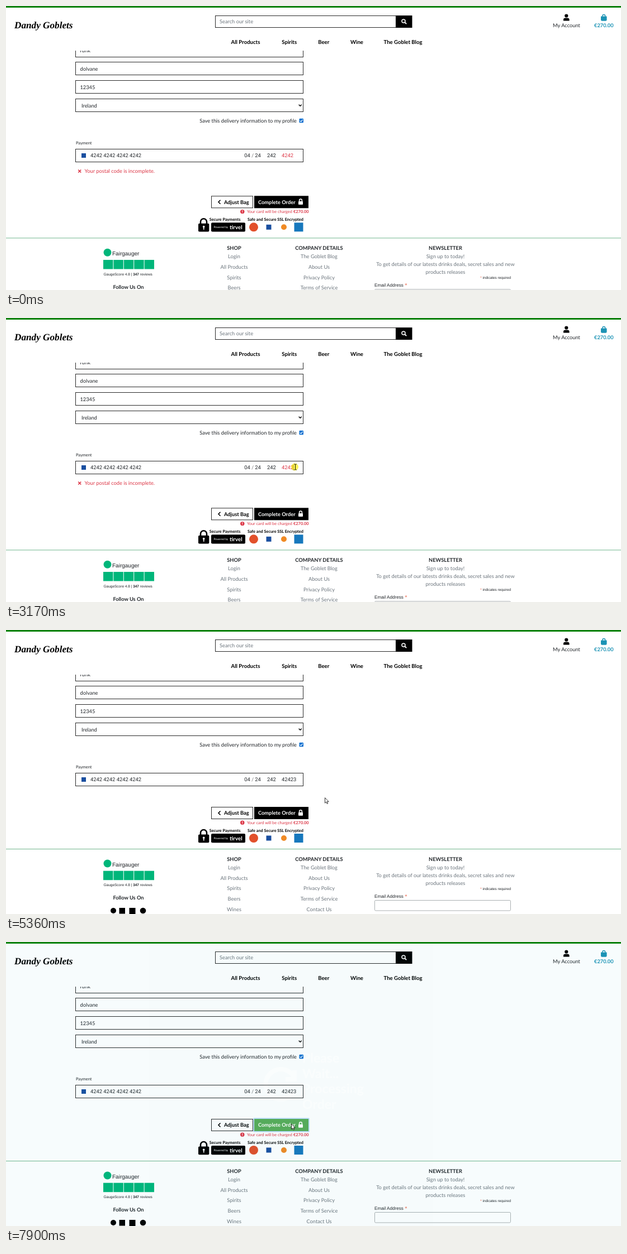
Animation of 1100x509 px, one loop 8000 ms. Source, as an HTML page:

```html
<!DOCTYPE html>
<html lang="en">
<head>
<meta charset="utf-8">
<title>Checkout</title>
<style>
  html, body { margin: 0; width: 100%; height: 100%; overflow: hidden; background: #fff; }
  svg { display: block; width: 100%; height: 100%; }
  text { font: 9.28px Lato, sans-serif; fill: #212529; text-rendering: geometricPrecision; white-space: pre; }
  .b { font-weight: 700; }
  .k { fill: #000; }
  .w { fill: #fff; }
  .m { text-anchor: middle; }
  .e { text-anchor: end; }
  .grey { fill: #6c757d; }
  .red { fill: #dc3545; }
  .teal { fill: #1c93b5; }
  .sm { font-size: 7.4px; }
  .nav { font-size: 9.6px; }
  .card { font: 9.35px Roboto, sans-serif; }
  .sans { font-family: "Liberation Sans", Arial, sans-serif; }
  .brand { font: italic 700 17.2px "Liberation Serif", serif; }
  .wait { font-size: 23px; }
  .box { fill: #fff; stroke: #2a2a2a; }
  .line { fill: none; stroke: #000; }
</style>
</head>
<body>
<svg viewBox="0 0 1100 509" preserveAspectRatio="none">
  <defs>
    <g id="lock">
      <path d="M-2.4 -.5v-2a2.4 2.4 0 0 1 4.8 0v2" fill="none" stroke="currentColor" stroke-width="1.5"/>
      <rect x="-4" y="-1" width="8" height="6" rx=".9" fill="currentColor"/>
    </g>
  </defs>

  <g id="form">
    <text x="132.5" y="83">runk</text>
    <text x="132.5" y="116">dolvane</text>
    <text x="132.5" y="148.5">12345</text>
    <text x="135" y="182">Ireland</text>
    <path class="line" d="M523.7 176.7l2.5 2.5 2.5-2.5" stroke-width="1.4"/>
    <text class="e" x="520" y="209">Save this delivery information to my profile</text>
    <rect x="524.5" y="201.8" width="7.5" height="7.5" rx="1.3" fill="#0b6fd0"/>
    <path d="M526 205.7l1.6 1.6 3-3.6" fill="none" stroke="#fff" stroke-width="1.2"/>
    <text class="sm" x="125" y="248.3">Payment</text>
    <rect x="135" y="264" width="8" height="8" fill="#1a4fa0"/>
    <text class="card" x="151" y="271.3">4242 4242 4242 4242</text>
    <text class="card" x="426.3" y="271.3">04 <tspan fill="#777">/</tspan> 24</text>
    <text class="card" x="467" y="271.3">242</text>
    <text class="card" x="493" y="271.3" id="zip"></text>
    <path id="caret" d="M0 263v10" class="line" stroke-width=".9"/>
    <g id="error">
      <path d="M129.2 293.5l5 5m0-5l-5 5" stroke="#dc3545" stroke-width="1.7"/>
      <text class="red" x="140.5" y="299.2">Your postal code is incomplete.</text>
    </g>
  </g>

  <g id="lower">
    <rect class="box" x="367.5" y="317.5" width="74" height="21"/>
    <path class="line" d="M383.5 324.5l-3.5 3.5 3.5 3.5" stroke-width="1.6"/>
    <text class="b k" x="390" y="331.3">Adjust Bag</text>
    <rect id="ring" x="442.2" y="315.2" width="100.6" height="25.6" rx="1.5" fill="#bfdeff"/>
    <rect x="444" y="317" width="97" height="22" fill="#fff"/>
    <g id="order">
      <rect id="fill" x="444" y="317" width="97" height="22"/>
      <text class="b w" x="451" y="331.3">Complete Order</text>
      <use href="#lock" x="527" y="327.7" color="#fff"/>
    </g>
    <circle cx="422.8" cy="345.3" r="3.7" fill="#dc3545"/>
    <path d="M422.8 343v2.8m0 .8v1.2" stroke="#fff" stroke-width="1.1"/>
    <text class="sm red" x="431" y="348">Your card will be charged</text>
    <text class="sm red b e" x="541.5" y="348">€270.00</text>

    <path class="line" d="M348 368v-4.5a5.5 5.5 0 0 1 11 0v4.5" stroke-width="2.6"/>
    <rect x="344" y="366.5" width="19.3" height="14.7" rx="1.8"/>
    <path d="M353.7 373v4.5" stroke="#fff" stroke-width="1.6"/>
    <circle cx="353.7" cy="372.3" r="1.8" fill="#fff"/>
    <text class="b k" x="363.7" y="362" style="font-size:7.3px">Secure Payments</text>
    <text class="b k" x="432" y="362" style="font-size:7.3px">Safe and Secure SSL Encrypted</text>
    <rect x="367" y="365" width="61" height="16.3" rx="2"/>
    <text class="w" x="371.5" y="375" style="font-size:5px">Powered by</text>
    <text class="w b" x="400" y="376.5" style="font-size:9.8px">tirvel</text>
    <circle cx="443" cy="373" r="8" fill="#e2502b"/>
    <rect x="465.5" y="368.5" width="9" height="9" fill="#1a4fa0"/>
    <circle cx="497" cy="373" r="5" fill="#f08a24"/>
    <rect x="515.5" y="365" width="16" height="16" fill="#1778bd"/>

    <path d="M0 392.6h1100" stroke="#70b58c"/>
    <circle cx="181.5" cy="418.5" r="7" fill="#00b67a"/>
    <text class="sans" x="190" y="424" style="font-size:10px">Fairgauger</text>
    <g id="rating" fill="#00b67a"></g>
    <text class="sans" x="174.5" y="459.3" style="font-size:6.5px">GaugeScore 4.8 | <tspan class="b">347</tspan> reviews</text>
    <text class="b m" x="219" y="483.3">Follow Us On</text>
    <circle cx="192" cy="503" r="5"/>
    <rect x="202.5" y="498" width="10.5" height="10.5"/>
    <rect x="220.5" y="498" width="11" height="11"/>
    <circle cx="245" cy="503" r="5.3"/>
    <g id="links"></g>
    <text class="sans" x="903" y="466" style="font-size:6.4px;text-anchor:end"><tspan fill="#e85c41">*</tspan> indicates required</text>
    <text class="sans" x="659" y="479.5" style="font-size:8.1px">Email Address</text>
    <text class="sans" x="713.5" y="481" style="font-size:10px;fill:#e85c41">*</text>
    <rect x="659.5" y="484.5" width="243" height="18.5" rx="1.7" fill="#fff" stroke="#abb0b2"/>
  </g>

  <g id="header">
    <rect width="1100" height="80" fill="#fff"/>
    <rect width="1100" height="2.9" fill="#008000"/>
    <text class="brand k" x="15" y="40">Dandy Goblets</text>
    <rect class="box" x="374.5" y="17.5" width="323" height="21"/>
    <text class="grey" x="382" y="31.3">Search our site</text>
    <rect x="697" y="17" width="29.5" height="22"/>
    <circle cx="711" cy="27" r="3" fill="none" stroke="#fff" stroke-width="1.5"/>
    <path d="M713.2 29.2l3 3" stroke="#fff" stroke-width="1.9"/>
    <circle cx="1002.3" cy="17.5" r="3.1"/>
    <path d="M997 26.5v-1.7q0-3.3 3.3-3.3h4q3.3 0 3.3 3.3v1.7z"/>
    <text class="m" x="1002.5" y="38.3">My Account</text>
    <path class="teal" d="M1064 18.5h10.6v6.2q0 2-2 2h-6.6q-2 0-2-2z"/>
    <path d="M1066.8 21v-3a2.5 2.5 0 0 1 5 0v3" fill="none" stroke="#1c93b5" stroke-width="1.3"/>
    <text class="teal b m" x="1069.3" y="38.3">€270.00</text>
  </g>

  <g id="overlay" opacity=".03">
    <rect width="1100" height="509" fill="#17a2b8"/>
    <g id="wait" opacity=".5">
      <path d="M514 240a27 27 0 1 0 0 30M516 230v16h-16" fill="none" stroke="#fff" stroke-width="8"/>
    </g>
  </g>

  <circle id="click" r="6.5" fill="#ffee00" opacity=".65"/>
  <g id="pointer">
    <path id="arrow" d="M0 0v9.5l2.2-2 1.5 3.4 1.5-.7-1.5-3.2h3z" fill="#fff" stroke="#000" stroke-width=".8"/>
    <path id="beam" class="line" d="M-2.3-5h1.8l.5.5.5-.5h1.8M-2.3 5h1.8l.5-.5.5.5h1.8M0-4.5v9" stroke-width=".9"/>
    <path id="hand" d="M-1 1q0-1.2 1-1.2t1 1.2v4l4 .8q1.5.3 1.5 1.7l-.6 3.5-.7 2.5h-5l-3.7-5q-.7-1.2.3-1.7t2.2 1z" fill="#fff" stroke="#000" stroke-width=".9"/>
  </g>
</svg>
<script>
const NS = 'http://www.w3.org/2000/svg';
const $ = id => document.getElementById(id);
function make(tag, attrs, text = '') {
  const el = document.createElementNS(NS, tag);
  for (const k in attrs) el.setAttribute(k, attrs[k]);
  el.textContent = text;
  return el;
}
const set = (id, k, v) => $(id).setAttribute(k, v);
const show = (id, on) => set(id, 'visibility', on ? 'visible' : 'hidden');
const label = (id, x, y, cls, s) => $(id).append(make('text', { x, y, class: cls }, s));

// Form fields go behind their text
for (const y of [68.5, 100.5, 133.5, 166.5, 256.5])
  $('form').prepend(make('rect', { class: 'box', x: 124.5, y, width: 407, height: 23 }));

[[428.5, 'All Products'], [506.7, 'Spirits'], [568.3, 'Beer'], [627.5, 'Wine'], [710, 'The Goblet Blog']]
  .forEach(([x, s]) => label('header', x, 68.3, 'b k m nav', s));

for (let i = 0; i < 5; i++)
  $('rating').append(make('rect', { x: 174 + i * 18.4, y: 431.7, width: 17.4, height: 16.5 }));

function column(x, step, title, ...rows) {
  label('links', x, 414, 'b m', title);
  rows.forEach((s, i) => label('links', x, 429.2 + i * step, 'grey m', s));
}
column(408, 18.6, 'SHOP', 'Login', 'All Products', 'Spirits', 'Beers', 'Wines');
column(560, 18.6, 'COMPANY DETAILS', 'The Goblet Blog', 'About Us', 'Privacy Policy', 'Terms of Service', 'Contact Us');
column(786, 14, 'NEWSLETTER', 'Sign up to today!',
  'To get details of our latests drinks deals, secret sales and new', 'products releases');
['Please', 'Wait...', 'Processing', 'Order'].forEach((s, i) => label('wait', 530, 216 + i * 27.7, 'b w wait', s));

// Pointer path: time, x, y
const path = [
  [190, 860, 498], [330, 610, 424], [540, 300, 330], [750, 180, 294], [950, 180, 294],
  [1300, 147, 271], [1710, 203.5, 273], [1850, 238, 277], [2180, 238, 277],
  [2400, 312, 289], [2600, 415, 291], [2800, 500, 276], [2940, 520, 268],
  [3010, 517.5, 267], [3280, 517.5, 267], [3350, 520.5, 268], [4950, 520.5, 268],
  [5160, 545, 279], [5420, 578, 307], [5600, 567, 326], [5710, 543, 331],
  [5770, 533.5, 328], [5970, 510.5, 326], [8000, 510.5, 326]
];
function position(t) {
  const i = Math.max(1, path.findIndex(p => p[0] > t));
  const [t0, x0, y0] = path[i - 1], [t1, x1, y1] = path[i];
  const k = Math.max(0, (t - t0) / (t1 - t0));
  return [x0 + (x1 - x0) * k, y0 + (y1 - y0) * k];
}
const within = (t, a, b) => t >= a && t < b;

function draw(t) {
  const valid = t >= 4630, sent = t >= 7900;
  $('zip').textContent = valid ? '42423' : '4242';
  set('zip', 'class', valid ? 'card' : 'card red');
  show('error', !valid);
  set('lower', 'transform', `translate(0 ${valid ? 0 : 23.3})`);

  show('caret', within(t, 3090, 3700) || within(t, 4220, 5160) || within(t, 5690, 6230) || within(t, 6780, 7290));
  set('caret', 'transform', `translate(${valid ? 519 : 513.7} 0)`);

  const hover = Math.min(1, Math.max(0, (t - 5735) / 150));
  set('fill', 'fill', `rgb(0 ${Math.round(128 * hover)} 0)`);
  set('order', 'opacity', sent ? .65 : 1);
  show('ring', t >= 7440);
  show('overlay', sent);

  const [x, y] = position(t);
  const hand = valid && !sent && within(x, 444, 541) && within(y, 317, 339);
  const beam = within(x, 132, 525) && within(y, 262, 275);
  set('pointer', 'transform', `translate(${x} ${y})`);
  show('hand', hand);
  show('beam', beam);
  show('arrow', t >= 190 && !hand && !beam);
  set('click', 'transform', `translate(${x - 1} ${y})`);
  show('click', within(t, 3090, 3350) || within(t, 7440, 7640));
}

const start = performance.now();
(function tick() {
  draw((performance.now() - start) % 8000);
  requestAnimationFrame(tick);
})();
</script>
</body>
</html>
```
